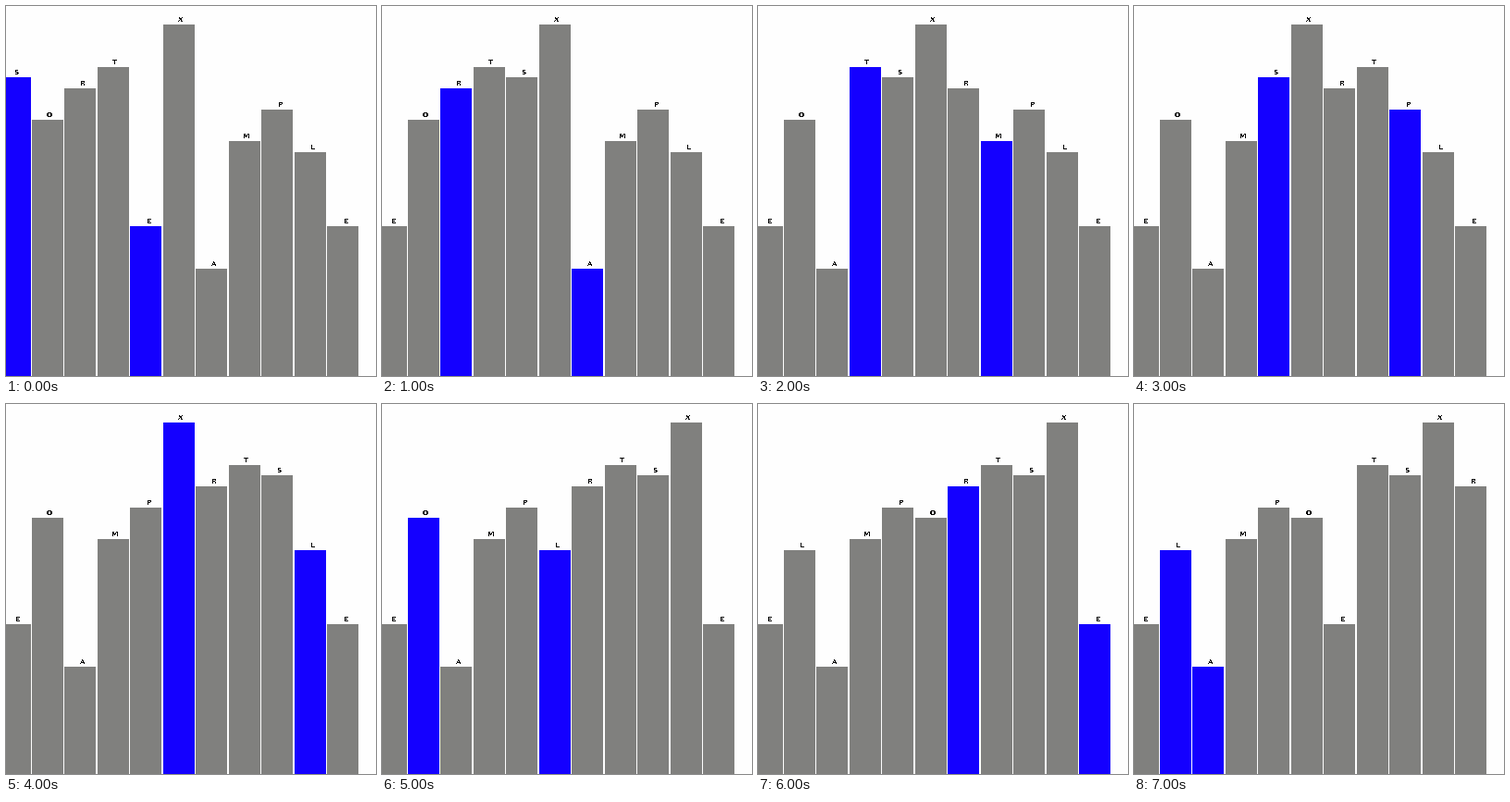
Animation, 400 px wide and 400 px high, one loop 8000 ms. Source, as a matplotlib script:

```python
import math

import matplotlib.pyplot as plt
from matplotlib.animation import FuncAnimation
from matplotlib.patches import Rectangle

SIZE = 400
DPI = 100
WORD = "SORTEXAMPLE"
STEPS = 8
PITCH = 390 / len(WORD)
BAR_WIDTH = 34
GRAY, BLUE, PAPER = "#80807e", "#1400ff", "#fefefe"


def shell_sort_swaps(word):
    """Yield the letters and the pair about to be swapped."""
    letters = list(word)
    for gap in (4, 1):
        for i in range(gap, len(letters)):
            j = i
            while j >= gap and letters[j] < letters[j - gap]:
                yield letters[:], (j - gap, j)
                letters[j], letters[j - gap] = letters[j - gap], letters[j]
                j -= gap


def bar_top(letter):
    return round(284 - (ord(letter) - ord("A")) * 264 / 23)


steps = list(shell_sort_swaps(WORD))[:STEPS]

fig = plt.figure(figsize=(SIZE / DPI, SIZE / DPI), dpi=DPI, facecolor=PAPER)
ax = fig.add_axes([0, 0, 1, 1])
ax.set(xlim=(0, SIZE), ylim=(SIZE, 0))
ax.axis("off")

bars, labels = [], []
for i in range(len(WORD)):
    left = math.floor(i * PITCH - 7)
    bar = Rectangle((left, 0), BAR_WIDTH, 0, linewidth=0, antialiased=False)
    bars.append(ax.add_patch(bar))
    labels.append(ax.text(
        round(i * PITCH + 12), 0, "", ha="center", va="baseline",
        family="DejaVu Serif", weight="bold", stretch="condensed",
        size=8 * 72 / DPI, color="black", antialiased=False))


def draw(frame):
    letters, pair = steps[frame]
    for i, (letter, bar, label) in enumerate(zip(letters, bars, labels)):
        top = bar_top(letter)
        bar.set_y(top)
        bar.set_height(SIZE - top)
        bar.set_facecolor(BLUE if i in pair else GRAY)
        label.set_text(letter)
        label.set_y(top - 3)
    return bars + labels


anim = FuncAnimation(fig, draw, frames=STEPS, interval=1000,
                     repeat=True, repeat_delay=0, blit=False)
plt.show()
```
